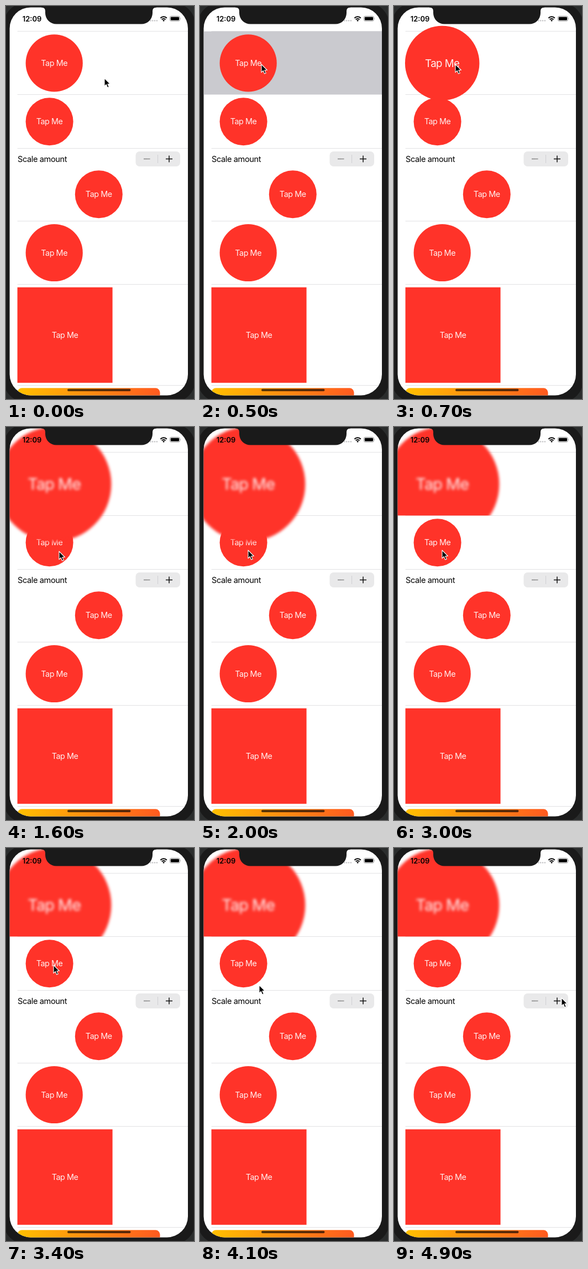
An HTML page that plays this animation: 340x708 px, repeating every 5000 ms.

```html
<!DOCTYPE html>
<html lang="en">
<head>
<meta charset="utf-8">
<title>Tap animation</title>
<style>
html, body { margin: 0; width: 100%; height: 100%; overflow: hidden; background: #2b2d2d; }
svg { display: block; width: 340px; height: 708px; font-family: Inter, "Liberation Sans", sans-serif; }
.red { fill: #ff3329; }
.tap { fill: #fff; fill-opacity: .93; font-size: 14.4px; letter-spacing: -.45px; text-anchor: middle; }
.label { font-size: 14.6px; letter-spacing: -.4px; }
.clock { font-size: 13px; font-weight: 600; }
.rule { stroke: #e2e2e4; }
.press { fill: #cacacf; }
</style>
</head>
<body>
<svg viewBox="0 0 340 708">
  <defs>
    <clipPath id="screen"><rect x="6.6" y="2.4" width="322.4" height="699" rx="38"/></clipPath>
    <clipPath id="aboveRow2"><rect id="cut" width="340"/></clipPath>
    <linearGradient id="warm">
      <stop offset="0" stop-color="#ffc000"/>
      <stop offset="1" stop-color="#ff5a20"/>
    </linearGradient>
  </defs>

  <rect x="-4" y="-5" width="346" height="718" rx="38" fill="#1a1a1a"/>

  <g clip-path="url(#screen)">
    <rect width="340" height="708" fill="#fff"/>
    <g id="rows"></g>

    <text class="label" x="21" y="280.7">Scale amount</text>
    <rect x="234.5" y="262" width="80.5" height="27" rx="7" fill="#e9e9ea"/>
    <path d="M249 275.5h11.5" stroke="#858585" stroke-width="1.4"/>
    <path d="M274.5 268v15" stroke="#cfcfd2"/>
    <path d="M289 275.5h12M295 269.5v12" stroke="#111" stroke-width="1.5"/>

    <rect x="20.6" y="688.3" width="257.9" height="60" rx="8" fill="url(#warm)"/>

    <g id="big"><g id="bigBody"></g></g>

    <text class="clock" x="29.7" y="27.7">12:09</text>
    <path d="M261.5 26.4h12" stroke="#b9b9bc" stroke-width="2.4" stroke-linecap="round" stroke-dasharray="0 3.8"/>
    <g fill="none" stroke="#000" stroke-width="2">
      <path d="M279.4 21.7a8 8 0 0 1 11.4 0"/>
      <path d="M281.7 24.3a4.8 4.8 0 0 1 6.8 0"/>
    </g>
    <path d="M283.2 25.9a2.7 2.7 0 0 1 3.8 0l-1.9 2z"/>
    <rect x="296.4" y="18.4" width="18" height="8.8" rx="2.6" fill="none" stroke="#8c8c8c" stroke-width=".9"/>
    <rect x="297.8" y="19.8" width="15.2" height="6" rx="1.4"/>
    <path d="M315.6 21.4q1.4 1.4 0 2.8z" fill="#8c8c8c"/>
    <rect x="111" y="689.8" width="114.5" height="4.2" rx="2.1" fill-opacity=".65"/>
  </g>

  <path fill="#1a1a1a" d="M64 1V2.4Q71 2.4 71 9V12.6a20 20 0 0 0 20 20H245a20 20 0 0 0 20-20V9Q265 2.4 272 2.4V1z"/>
  <path id="cursor" d="M0 0V14.6L3.3 11.5L5.6 17L8.2 15.9L5.9 10.5H10.4z" stroke="#fff" stroke-width="1.1" stroke-linejoin="round"/>
</svg>
<script>
const LOOP = 5000, STEP = 100;
const LEFT = 20.6, MIDDLE = 167.8, INSET = 15, PAD = 5.1, GAP = 10.7;
const LARGE = 51.6, SMALL = 43, SQUARE = 86;
const $ = id => document.getElementById(id);

const caption = (x, y) => `<text class="tap" x="${x}" y="${y + 5.2}">Tap Me</text>`;
const disc = (x, y, r) => `<circle class="red" cx="${x}" cy="${y}" r="${r}"/>` + caption(x, y);
const block = (x, y, r) =>
  `<rect class="red" x="${x - r}" y="${y - r}" width="${2 * r}" height="${2 * r}"/>` + caption(x, y);

// List rows stack downwards, each as tall as its button plus any extra content
const rows = [
  { r: LARGE }, { r: SMALL }, { r: SMALL, x: MIDDLE, extra: 34.3 }, { r: LARGE },
  { r: SQUARE, x: LEFT + SQUARE, shape: block }
];
let edge = 45.7;
const rule = () => `<path class="rule" d="M${LEFT} ${Math.floor(edge) + .5}H329"/>`;
$('rows').innerHTML = rows.map((row, i) => {
  const { r, x = LEFT + INSET + r, extra = 0, shape = disc } = row;
  const height = 2 * r + GAP + extra;
  const line = rule();
  row.top = edge;
  row.x = x;
  edge += height;
  row.y = edge - PAD - r;
  const press = `<rect id="press${i}" class="press" x="6.6" y="${row.top}" width="323" height="${height}" opacity="0"/>`;
  return line + press + (i ? shape(x, row.y, r) : '');
}).join('') + rule();
$('bigBody').innerHTML = disc(0, 0, LARGE);
$('cut').setAttribute('height', rows[1].top);

const clamp = p => Math.min(1, Math.max(0, p));
const smooth = p => p * p * (3 - 2 * p);
const ease = (t, from, to) => smooth(clamp((t - from) / (to - from)));

const start = { x: 178, y: 130 };
const moves = [
  { from: 0, to: 400, x: 111, y: 105 },
  { from: 1200, to: 1600, x: 96, y: 224 },
  { from: 1600, to: 2000, x: 87, y: 222 },
  { from: 3100, to: 3400, x: 86, y: 211 },
  { from: 3800, to: 4100, x: 107, y: 247 },
  { from: 4200, to: 4900, x: 303, y: 270 }
];
const pointer = t => moves.reduce((p, m) => {
  const k = ease(t, m.from, m.to);
  return { x: p.x + (m.x - p.x) * k, y: p.y + (m.y - p.y) * k };
}, start);

// Row highlight: on at once, held briefly, then faded
const HOLD = 150, FADE = 200, GROW = 350, RAISE = 2600;
const flash = (t, on) => t < on ? 0 : 1 - clamp((t - on - HOLD) / FADE);
const glow = (t, ...times) => Math.max(...times.map(on => flash(t, on)));

function draw(t) {
  const scale = 1 + (ease(t, 500, 500 + GROW) + ease(t, 950, 950 + GROW)) / 2;
  $('bigBody').setAttribute('transform', `translate(${rows[0].x} ${rows[0].y}) scale(${scale})`);
  $('big').style.filter = scale > 1 ? `blur(${(scale - 1) * 2.6}px)` : 'none';
  // The second row comes to the front once it is pressed
  $('big').setAttribute('clip-path', t >= RAISE ? 'url(#aboveRow2)' : 'none');
  $('press0').setAttribute('opacity', glow(t, 350, 900));
  $('press1').setAttribute('opacity', glow(t, RAISE, 3600));
  const { x, y } = pointer(t);
  $('cursor').setAttribute('transform', `translate(${x} ${y})`);
}

const begin = performance.now();
function tick() {
  const t = (performance.now() - begin) % LOOP;
  draw(Math.floor(t / STEP) * STEP);
  requestAnimationFrame(tick);
}
tick();
</script>
</body>
</html>
```
